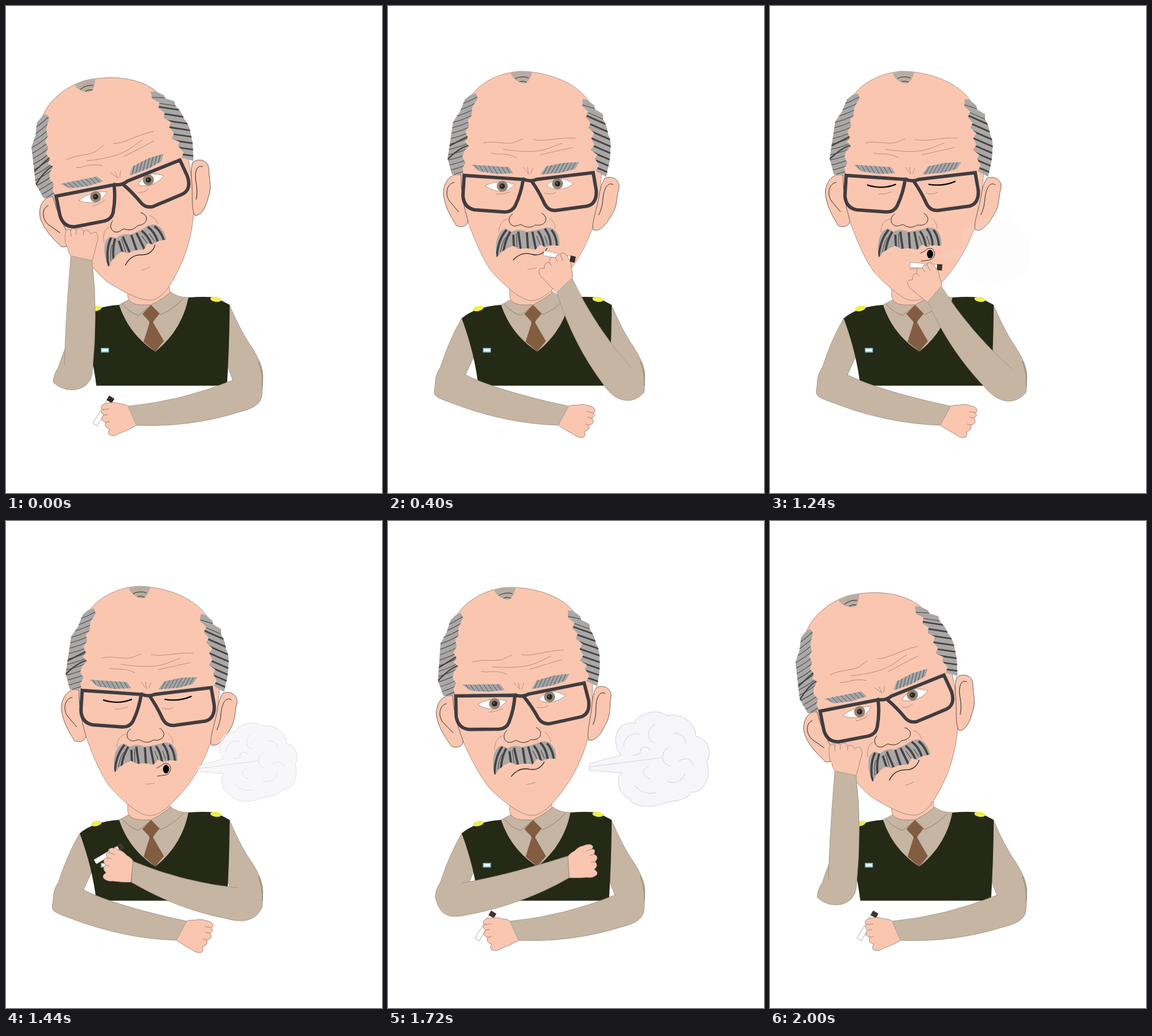
These frames come from a looping animation (612x792 px, 2.4 s). An HTML page:

```html
<!DOCTYPE html>
<html>
<head>
<meta charset="utf-8">
<style>
html, body { margin: 0; width: 100%; height: 100%; overflow: hidden; background: #fff; }
svg { display: block; width: 612px; height: 792px; }
path, ellipse, circle { fill: none; }
.skin { fill: #fac6b0; stroke: #7d6a62; stroke-width: .6; }
.cloth { fill: #c6b5a2; stroke: #94887c; stroke-width: .7; }
.ink { stroke: #2b2422; stroke-width: .9; }
.fine { stroke: #a17d6f; stroke-width: .7; }
.hair { fill: #aaa8a6; }
.hatch { stroke: #474244; }
.tie { fill: #825d42; }
.frame { stroke: #413c3f; stroke-width: 5.5; }
</style>
</head>
<body>
<svg viewBox="0 0 612 792">
  <defs>
    <clipPath id="cutL"><path d="M143,142L146,150L137,165L136,178L130,185L132,195L126,205L130,214L125,221L132,228L124,236L121,246L126,255L121,264L123,273L104,274L97,248L104,202L106,188L117,172L125,152Q134,144 143,142Z"/></clipPath>
    <clipPath id="cutR"><path d="M317,151L325,153L336,162L337,168L350,176L350,184Q357,196 358,208Q364,220 362,234Q362,250 358,264L355,278L338,268L343,260L337,248L341,242L330,234L336,226L331,215L336,207L326,198L330,190L322,181L326,172L316,163Z"/></clipPath>
    <clipPath id="cutM"><path d="M177,409C173,388 178,363 193,362L201,367Q212,361 225,367Q240,365 252,362Q262,358 270,363Q280,372 279,390L266,389L256,392L248,388L240,396L226,394L212,395L204,390L194,394L185,400Z"/></clipPath>
    <clipPath id="cutB"><path d="M136,258L150,259L197,262L204,272L178,273L149,269ZM248,274L257,261L285,255L311,254L304,265L282,271Z"/></clipPath>
    <path id="fist" class="skin" d="M193,-17Q199,-22 205,-23Q214,-29 221,-28.500Q233,-31 236,-25Q237,-22 233,-20.500Q241,-20 235.500,-11.500Q244,-5 234.600,.7Q240,8 231,12.800Q236,18 233.500,22Q226,27 217,23.400Q204,22 188,18M233,-20.500L224,-19M235.500,-11.500L228,-11M234.600,.7L228,1"/>
  </defs>

  <!-- body -->
  <path class="cloth" d="M120,508Q100,542 85,588Q77,600 77,612L100,624L126,600L138,574L150,510Z"/>
  <path class="cloth" d="M364,487Q384,533 400,555Q420,586 418,604L417,628L395,630L369,608L361,587Z"/>
  <path class="ink" style="opacity:.45" d="M411,578Q419,600 417,618"/>
  <path class="cloth" d="M184,486L199,478L232,486L268,465Q279,474 297,474L290,530L243,562L195,530Z"/>
  <path class="skin" d="M198,455V472Q200,485 218,486H236Q256,476 267,466L265,453Z"/>
  <path class="fine" style="stroke:#7d7064" d="M189,485Q203,500 216,503L236,487L251,502Q272,494 289,475"/>
  <path class="tie" d="M236,486L222,501L234,514L224,546L243,562L257,545L239,514L250,500Z"/>
  <path stroke="#5c422b" stroke-width=".8" d="M233,514H240"/>
  <path style="fill:#242a15" d="M120,508Q142,489 184,486Q200,534 243,562Q286,528 297,474Q322,472 341,474L364,486Q364,540 360,612L350,617.500H147Q141,565 120,508Z"/>
  <ellipse cx="147" cy="492" rx="9" ry="4" transform="rotate(-14 147 492)" style="fill:#eeee46"/>
  <ellipse cx="341.500" cy="477" rx="9" ry="4" transform="rotate(8 341 477)" style="fill:#eeee46"/>
  <rect x="154.500" y="556" width="13" height="7.500" fill="#8cc8d4"/>
  <rect x="156" y="558" width="10" height="3.500" fill="#f4fbfb"/>

  <g id="head">
    <path class="skin" d="M218,106C262,108 306,124 327,155C347,190 352,240 346,290C345,350 317,408 285,443C262,470 245,480 232,479C215,478 190,455 168,431C150,405 138,372 128,345C114,300 112,200 134,148C150,123 185,107 218,106Z"/>
    <path class="skin" d="M119,275C104,270 90,285 90,305C92,327 104,345 111,357C121,362 131,356 130,349Q118,310 119,275" style="stroke:#2b2422"/>
    <path class="ink" d="M108,287C96,288 92,306 100,317L115,335"/>
    <path class="skin" d="M353,280C366,275 378,284 376,296C371,312 375,325 362,343C351,362 341,367 334,364C331,352 340,330 343,312Q346,290 353,280" style="stroke:#2b2422"/>
    <path class="ink" d="M367,291C357,284 351,300 350,312Q349,328 343,340"/>
    <path d="M200,109Q218,105 235,107C232,119 226,127 220,126C210,124 202,117 200,109Z" style="fill:#b9aca3"/>
    <path class="ink" d="M207,118Q218,113 229,117M214,123Q220,121 226,124"/>
    <g clip-path="url(#cutL)"><path class="hair" d="M90,135H150V280H90Z"/><path id="hatchL" class="hatch"/><path class="hatch" stroke-width="2.200" d="M96,250Q114,232 132,226M97,229L130,212"/></g>
    <g clip-path="url(#cutR)"><path class="hair" d="M310,145H370V285H310Z"/><path id="hatchR" class="hatch" stroke-width="2.600"/><path class="hatch" d="M314,160L340,168M318,170L350,184"/></g>
    <path class="fine" d="M155,223C172,218 192,226 205,222L220,216M168,239C180,243 190,237 210,247M236,217C255,222 275,213 305,215M187,233C215,237 240,239 260,232L284,223M247,242L301,230M220,262L228,272M227,262L229,274M236,263L232,273"/>
    <g clip-path="url(#cutB)"><path style="fill:#a3a6a8" d="M130,250H315V278H130Z"/><path id="hatchB" class="hatch" stroke-width=".8"/></g>

    <g id="open">
      <path d="M158,292Q180,281 206,290Q197,300 186,302Q170,301 158,292ZM258,292Q266,282 284,281Q296,284 302,289Q290,298 275,298Q264,297 258,292Z" style="fill:#fff;stroke:#8a6f64;stroke-width:.6"/>
      <g id="irises"></g>
    </g>
    <path id="shut" stroke="#000" stroke-width="2" d="M158,291Q182,299 205,290M258,290Q282,294 302,285"/>
    <path class="fine" d="M176,306Q188,307 199,302M254,304Q264,308 273,303"/>
    <path class="frame" d="M124,275.500L220,282Q217,304 207,325Q202,335 190,335L141,331.500Q123,328 122,308L124,275.500ZM219,281Q231,287 242,282L334,271L339,300Q340,322 324,325.500L273,332.500Q261,333 255,322Q246,302 234,285"/>
    <path class="ink" d="M203,338C196,342 195,352 201,356C208,361 213,354 218,356C225,361 233,361 240,356C249,358 258,354 257,345Q255,339 250,337"/>
    <path class="fine" d="M180,368Q181,350 195,346M263,345Q272,352 272,362"/>
    <g clip-path="url(#cutM)"><path class="hair" d="M170,355H285V412H170Z"/><path class="hatch" stroke-width="3.600" d="M177,408Q179,380 193,364M188,399Q190,382 199,367M241,397L235,367M228,397L226,368M216,395L212,367M205,393L204,372M254,393Q252,376 244,366M265,390Q264,372 255,362M275,390Q274,374 266,364"/><path class="hatch" d="M183,400Q187,380 192,376M210,392L209,370M248,389L242,374M260,388L255,374"/></g>
    <path id="lips" class="ink" stroke-linecap="round" style="stroke-width:1.300" d="M204,413C212,404 222,400 235,404C246,407 255,401 259,394"/>
    <g id="blow">
      <path class="ink" d="M245,402Q252,399 256,395Q266,391 268,402Q268,411 260,413L246,415"/>
      <ellipse cx="260.500" cy="403.500" rx="5" ry="7" style="fill:#000"/>
    </g>
    <path class="fine" d="M227,428Q236,428 242,426"/>
  </g>

  <g id="handL"><use href="#fist"/></g>
  <path id="armL" class="cloth"/>
  <g id="handR">
    <g transform="translate(259.500,0) rotate(-135.500)">
      <rect y="-4" width="45" height="8" fill="#fff" stroke="#999" stroke-width=".7"/>
      <rect id="tip" x="44" y="-5" width="8.500" height="10"/>
    </g>
    <use href="#fist" x="7"/>
  </g>
  <path id="armR" class="cloth"/>

  <g id="smoke" stroke="#cbcbcd" stroke-width="1.100">
    <path style="fill:#f3f2f8" d="M335,394L383,381C368,365 372,330 403,333C408,318 440,310 452,322C475,317 497,335 495,353C515,357 520,378 512,391C520,415 505,440 488,437C480,452 460,449 450,453C430,462 400,459 396,447C378,440 375,420 383,408L335,404Z"/>
    <path d="M335,399L445,385M387,370C385,355 400,346 411,350M433,335C420,345 422,361 434,363M461,349C475,347 480,356 480,364M454,370C441,378 443,394 457,398M470,390C480,383 490,388 492,397M425,398C412,402 415,415 427,417M404,427C412,440 430,440 436,437M453,421C465,426 478,418 479,408M400,381Q413,382 413,372M411,374Q417,364 428,374"/>
  </g>
</svg>
<script>
const $ = id => document.getElementById(id);
const set = (id, name, value) => $(id).setAttribute(name, value);
const show = (id, on) => $(id).style.display = on ? '' : 'none';
const lerp = (a, b, k) => a + (b - a) * k;
const lines = (n, f) => Array.from({length: n}, (_, i) => f(i)).join('');

set('hatchL', 'd', lines(16, i => `M92,${158 + i * 8.5}Q120,${154 + i * 8.5} 148,${138 + i * 8.5}`));
set('hatchR', 'd', lines(9, i => `M314,${174 + i * 11}Q335,${184 + i * 11} 366,${197 + i * 11}`));
set('hatchB', 'd', lines(9, i => `M${140 + i * 7},256l10,17M${252 + i * 6},275l12,-22`));
$('irises').innerHTML = [[186, 293], [276, 289]].map(([x, y]) =>
  `<circle cx="${x}" cy="${y}" r="9" style="fill:#958473"/>
   <circle cx="${x}" cy="${y}" r="4.500" style="fill:#2a2523"/>
   <circle cx="${x - 1}" cy="${y - 1}" r="1.500" style="fill:#6b6058"/>`).join('');

// Maps forearm coordinates (along, across) to the stage; side is -1 for the mirrored arm
const limb = (cx, cy, deg, side) => {
  const a = deg * Math.PI / 180, c = Math.cos(a), s = Math.sin(a);
  return (x, y) => `${(cx + x * c - side * y * s).toFixed(2)},${(cy + x * s + side * y * c).toFixed(2)} `;
};

// Rises over 400 ms, holds, then falls over 400 ms from the given time
const swing = (t, fall) => Math.max(0, Math.min(1, t / 400, 1 - (t - fall) / 400));

function draw(t) {
  const p = swing(t, 1600), q = swing(t, 1200);
  set('head', 'transform', `rotate(${15 * (p - 1)} 231 454)`);

  const left = lerp(-85.4, 20.2, p), L = limb(107, 600, left, 1);
  const bulge = 33 + 11 * Math.min(1, p * 1.6);
  set('handL', 'transform', `translate(107,600) rotate(${left})`);
  set('armL', 'd', `M${L(15, lerp(-13, -7, p))}Q${L(75, lerp(-17, 0, p))}${L(193, -17)}L${L(188, 18)}Q${L(105, bulge + 2)}${L(8, bulge)}C${L(-26, bulge)}${97 - 21 * p},632 77,612`);

  const right = lerp(166, 236.5, q), R = limb(396.6, 618, right, -1);
  set('handR', 'transform', `translate(396.6,618) rotate(${right}) scale(1,-1)`);
  set('armR', 'd', `M${R(23, -16)}Q${R(112, -3)}${R(200, -16)}L${R(194.5, 17.5)}Q${R(110, 42)}${R(28, 37)}C${R(-4, 37.5)}${lerp(417, 396, q)},${lerp(643, 652, q)} 417,628`);

  const ash = swing(t - 800, 1320);
  set('tip', 'fill', `rgb(60,${lerp(41, 54, ash)},${lerp(30, 44, ash)})`);

  const blowing = t >= 1200 && t < 1640;
  show('open', !blowing);
  show('lips', !blowing);
  show('shut', blowing);
  show('blow', blowing);

  const k = (t - 1200) / 400, out = Math.min(1, k);
  const size = k < 1 ? lerp(.745, 1, k) : 1 + .267 * (k - 1);
  show('smoke', k > 0 && k < 2);
  set('smoke', 'opacity', Math.max(0, 1 - Math.abs(k - 1)));
  set('smoke', 'transform', `translate(${lerp(344, 425, out)},${lerp(400, 388, out)}) scale(${size}) translate(-425,-388)`);
}

const start = performance.now();
function tick() {
  const t = (performance.now() - start) % 2400;
  draw(Math.floor(t / 40) * 40);
  requestAnimationFrame(tick);
}
tick();
</script>
</body>
</html>
```
